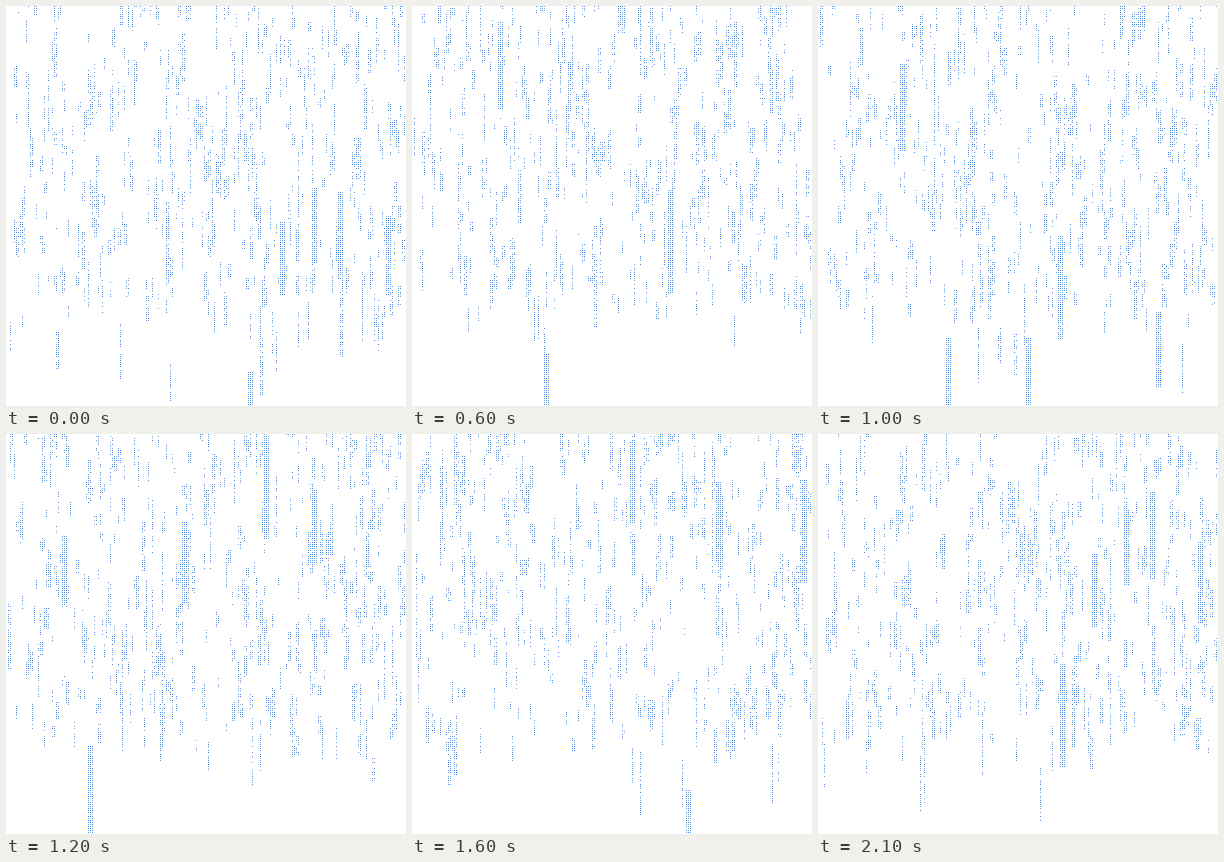
An HTML page with a canvas for the animation above (2.2 s loop, 400 by 400 pixels).

```html
<!DOCTYPE html>
<html lang="en">
<head>
<meta charset="utf-8">
<title>Rain</title>
<style>
html, body { margin: 0; width: 100%; height: 100%; overflow: hidden; background: #fff; }
canvas { display: block; width: 400px; height: 400px; image-rendering: pixelated; }
</style>
</head>
<body>
<canvas id="rain" width="400" height="400"></canvas>
<script>
const SIZE = 400, COUNT = 430, STEPS = 22, STEP_MS = 100;
const FALL = 1.35; // streak lengths fallen per step
const COLORS = ['#3f7fdd', '#5a96e3', '#78a9dc'];
const ctx = document.getElementById('rain').getContext('2d');

let seed = 4127;
function random(min = 0, max = 1) {
  seed = (seed * 1664525 + 1013904223) % 4294967296;
  return min + (max - min) * seed / 4294967296;
}

// The speckle of the streaks, fixed to the stage; fill is the share of dots kept.
function speckle(fill) {
  const tile = document.createElement('canvas');
  tile.width = tile.height = 100;
  const c = tile.getContext('2d');
  for (let y = 0; y < 100; y += 2) {
    for (let x = 0; x < 100; x += 2) {
      if (random() > fill) continue;
      c.fillStyle = COLORS[Math.floor(random(0, COLORS.length))];
      c.fillRect(x, y, 1, 1);
    }
  }
  return ctx.createPattern(tile, 'repeat');
}
const far = speckle(0.72), near = speckle(0.96);

// Many short far drops and few long near ones; near drops fall faster and land lower.
// Every fall has its own column.
const drops = Array.from({ length: COUNT }, (_, i) => {
  const len = Math.round(9 - 14 * Math.log((i + 0.5) / COUNT));
  const span = 250 + 2.2 * len + random(0, 45);
  const falls = Math.max(1, Math.round(STEPS * FALL * len / span));
  return {
    len, span, falls,
    phase: random(),
    width: len > 70 ? 6 : 2 * Math.ceil(random(0, 1.5)),
    fill: len > 70 ? near : far,
    columns: Array.from({ length: falls }, () => Math.floor(random(0, SIZE)))
  };
});

function draw(step) {
  ctx.clearRect(0, 0, SIZE, SIZE);
  for (const d of drops) {
    const turn = d.phase + d.falls * step / STEPS;
    const x = d.columns[Math.floor(turn) % d.falls];
    const y = Math.round(turn % 1 * d.span - d.len);
    ctx.fillStyle = d.fill;
    ctx.fillRect(x, y, d.width, d.len);
  }
}

let shown = -1;
function tick() {
  const step = Math.floor(performance.now() / STEP_MS) % STEPS;
  if (step !== shown) draw(shown = step);
  requestAnimationFrame(tick);
}
tick();
</script>
</body>
</html>
```
